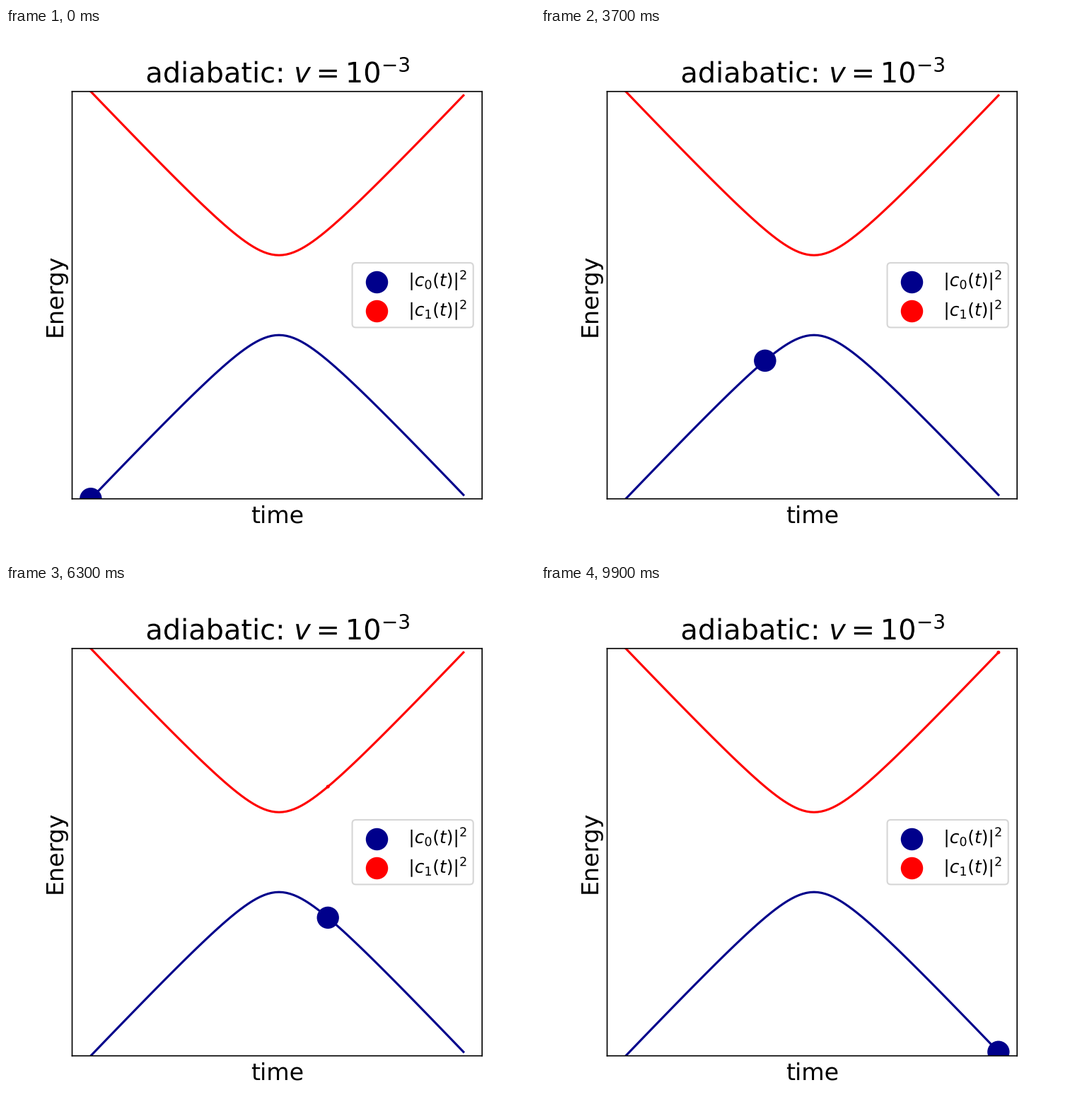
A matplotlib script that plays this animation: 748x748 px, repeating every 10 s.

```python
import numpy as np
import matplotlib.pyplot as plt
from matplotlib.animation import FuncAnimation
from matplotlib.patheffects import Normal

N = 100          # time steps per sweep
GAP = 0.2        # half of the minimum level splitting
P_LZ = 0.01      # population left in the upper level after the crossing
SIZE = 200       # marker area for full population
COLORS = ["darkblue", "red"]

plt.rcParams.update({"font.size": 16, "text.hinting": "no_hinting",
                     "path.snap": False})

t = np.arange(N) - N // 2
energy = np.hypot(t / (N // 2), GAP)
levels = [-energy, energy]

fig, ax = plt.subplots(figsize=(5, 5), dpi=748 / 5)
for level, color in zip(levels, COLORS):
    ax.plot(t, level, color=color, lw=1.5)

margin = 0.05 * (t[-1] - t[0])
ax.set_xlim(t[0] - margin, t[-1] + margin)
ax.set_ylim(-energy[0], energy[0])
ax.set_xticks([])
ax.set_yticks([])
ax.set_xlabel("time")
ax.set_ylabel("Energy")
title = ax.set_title(r"adiabatic: $v = 10^{-3}$", x=0.502)

handles = [ax.scatter([], [], s=SIZE, color=c) for c in COLORS]
labels = [rf"$|c_{k}(t)|^2$" for k in range(2)]
legend = ax.legend(handles, labels, loc="center right", fontsize=12,
                   borderpad=0.34, labelspacing=0.38, handlelength=2.06)
legend.get_frame().set_snap(False)

# Math text drawn as outlines keeps its sub-pixel spacing
for text in [title, *legend.get_texts()]:
    text.set_path_effects([Normal()])

dots = ax.scatter([t[0]] * 2, [level[0] for level in levels],
                  s=[SIZE, 0], c=COLORS)


def update(i):
    upper = P_LZ if t[i] > 0 else 0.0
    dots.set_offsets([(t[i], level[i]) for level in levels])
    dots.set_sizes(SIZE * np.array([1 - upper, upper]))
    return (dots,)


anim = FuncAnimation(fig, update, frames=N, interval=100, repeat=True,
                     repeat_delay=0)
plt.show()
```
